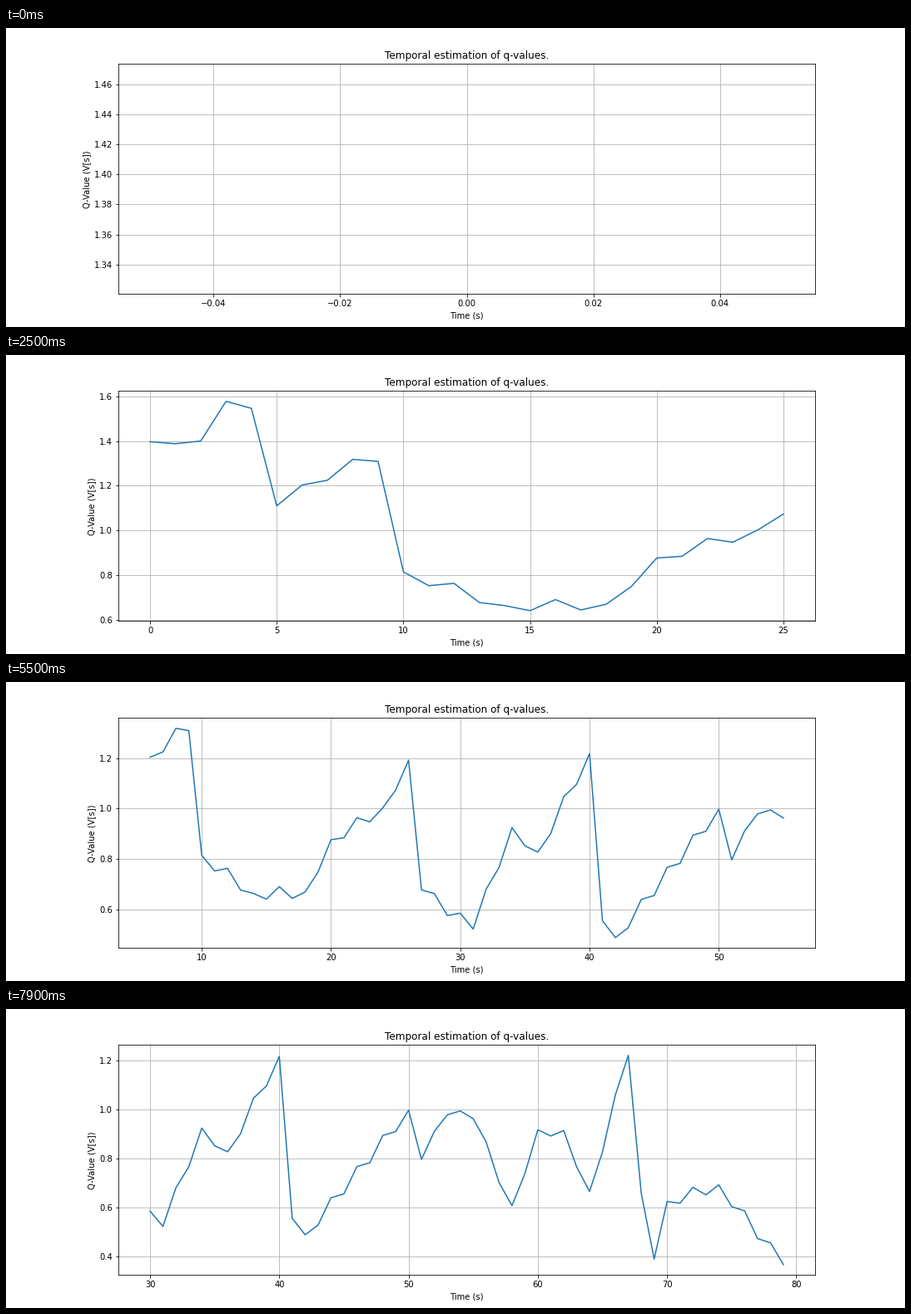
Recreate the animation shown at these times as a matplotlib script. Size 1080 by 360 pixels, loop 8 s.

```python
import matplotlib.pyplot as plt
import numpy as np
from matplotlib.animation import FuncAnimation

WINDOW = 50
FRAMES = 80
STEP_MS = 100
RIPPLE = 0.024

# Turning points of the estimate: (second, value).
TURNS = [
    (0, 1.397), (1, 1.388), (2, 1.4), (3, 1.5775), (4, 1.546), (5, 1.11),
    (8, 1.318), (9, 1.309), (10, 0.815), (14, 0.664), (18, 0.67),
    (20, 0.877), (24, 1.003), (26, 1.192), (27, 0.678), (31, 0.523),
    (34, 0.925), (36, 0.828), (40, 1.218), (41, 0.556), (42, 0.489),
    (50, 0.998), (51, 0.797), (53, 0.979), (55, 0.963), (58, 0.608),
    (60, 0.918), (62, 0.915), (64, 0.666), (67, 1.222), (68, 0.659),
    (69, 0.39), (70, 0.625), (74, 0.693), (79, 0.367),
]


def estimates():
    """Straight runs between turning points, with a ripple on top."""
    at, level = zip(*TURNS)
    secs = np.arange(FRAMES)
    ripple = np.where(secs % 2, -RIPPLE, RIPPLE)
    ripple[list(at)] = 0
    return secs, np.interp(secs, at, level) + ripple


secs, q_values = estimates()
fig, ax = plt.subplots(figsize=(15, 5), dpi=72)


def update(now):
    """Plot the latest window of estimates with freshly scaled axes."""
    shown = slice(max(0, now + 1 - WINDOW), now + 1)
    ax.clear()
    ax.plot(secs[shown], q_values[shown])
    ax.set_title("Temporal estimation of q-values.")
    ax.set_xlabel("Time (s)")
    ax.set_ylabel("Q-Value (V[s])")
    ax.grid(True)
    return ax.get_lines()


def reset():
    return update(0)


anim = FuncAnimation(fig, update, frames=FRAMES, init_func=reset,
                     interval=STEP_MS, repeat=True, repeat_delay=0)
plt.show()
```
